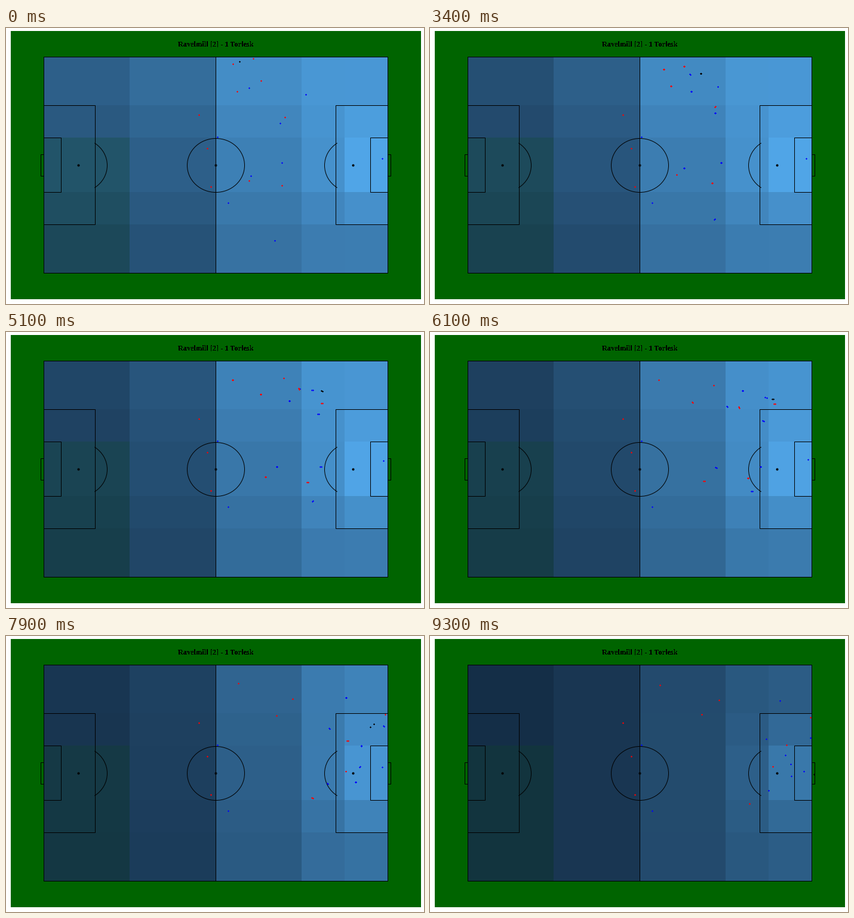
Write a matplotlib script that moves like this. It is 700 by 461 pixels and loops after 10000 ms.

```python
import numpy as np
import matplotlib.pyplot as plt
from matplotlib.animation import FuncAnimation
from matplotlib.collections import LineCollection
from matplotlib.patches import Arc, Ellipse, Rectangle

W, H, DPI = 700, 461, 64
PX = 72 / DPI                      # points per pixel
FRAMES, STEP, LAST = 100, 100, 93  # the play stops at LAST, then holds
END = LAST * STEP

# Each runner passes four points, at these moments in ms
KEY_T = np.array([0, 3400, 7100, END])
REDS = [
    [(414, 51), (391, 69), (388, 78), (385, 82)],
    [(380, 60), (426, 64), (478, 100), (484, 107)],
    [(387, 106), (404, 97), (449, 130), (455, 131)],
    [(427, 88), (454, 76), (548, 159), (597, 182)],
    [(467, 149), (478, 131), (619, 126), (637, 136)],
    [(407, 255), (413, 245), (490, 261), (535, 280)],
    [(462, 263), (473, 259), (558, 234), (574, 218)],
]
BLUES = [
    [(391, 56), (436, 78), (552, 100), (586, 108)],
    [(407, 100), (438, 106), (522, 140), (563, 172)],
    [(502, 111), (482, 98), (612, 132), (637, 170)],
    [(459, 159), (478, 142), (586, 168), (595, 199)],
    [(462, 225), (488, 225), (578, 222), (604, 214)],
    [(410, 247), (426, 234), (512, 236), (567, 258)],
    [(450, 355), (477, 319), (566, 253), (605, 234)],
    [(630, 218), (630, 218), (632, 215), (626, 226)],
]
STILL_REDS = [(337, 201), (323, 145), (343, 265)]
STILL_BLUES = [(354, 182), (372, 292)]

# Dribble, carry wide, cross, shot
BALL_T = [0, 3400, 7100, 7700, 8200, END]
BALL = np.array([(391, 56), (454, 76), (620, 126), (632, 131),
                 (577, 184), (643, 231)])

# Control zones: level per column at both ends, and how late it fades
EDGE_X = [63, 207, 351, 495, 567, 639]
EDGE_Y = [48, 129, 183, 274, 328, 409]
START = [.29, .39, .63, .70, .69]
FINISH = [.02, .085, .235, .33, .35]
LATE = [1.1, 1.4, 3, 5, 6.5]
TILT = .05                         # extra level per row towards the top
GOAL = np.array([639, 229])
LOW, HIGH = np.array([[19, 43, 67], [86, 177, 247]]) / 255
GRASS = np.array([0, 100, 0]) / 255


def ease(t):
    u = (t / END) ** 1.4
    return u * u * (3 - 2 * u)


def curves(runs):
    """Cubic coefficients through the four points of each run."""
    return np.linalg.solve(np.vander(ease(KEY_T)), np.array(runs, float))


def along(coefs, t):
    return np.einsum("k,nkd->nd", np.vander([ease(t)], 4)[0], coefs)


def zone_color(r, c, t):
    fade = (t / END) ** LATE[c]
    center = np.array([EDGE_X[c] + EDGE_X[c + 1], EDGE_Y[r] + EDGE_Y[r + 1]]) / 2
    level = START[c] + (FINISH[c] - START[c]) * fade
    level += TILT * (2 - r) * (1 - fade)
    level += .26 * np.exp(-np.sum((center - GOAL) ** 2) / 90 ** 2)
    color = LOW + (HIGH - LOW) * np.clip(level, 0, 1)
    if c == 0 and r >= 2:          # grass shows through the quiet corner
        color = color + .12 * (GRASS - color)
    return color


fig = plt.figure(figsize=(W / DPI, H / DPI), dpi=DPI, facecolor="white")
ax = fig.add_axes([0, 0, 1, 1])
ax.set(xlim=(0, W), ylim=(H, 0))
ax.axis("off")

ax.add_patch(Rectangle((8, 5), 687, 448, fc="#006400", lw=0))
ax.text(351, 31, "Ravelmill [2] - 1 Torlesk", ha="center", va="baseline",
        family="Liberation Serif", weight="bold", size=12.2 * PX,
        antialiased=False)

zones = {}
for r in range(5):
    for c in range(5):
        x, y = EDGE_X[c], EDGE_Y[r]
        zones[r, c] = ax.add_patch(Rectangle(
            (x, y), EDGE_X[c + 1] - x, EDGE_Y[r + 1] - y, lw=0, aa=False))

# Strokes run through pixel centres, so snapping stays off
pen = dict(fill=False, ec="black", lw=PX, snap=False)
MID = (351.5, 229.5)
for x0, x1, y0, y1 in [(63, 639, 48, 409), (63, 351, 48, 409),
                       (63, 149, 129, 328), (552, 639, 129, 328),
                       (63, 92, 183, 274), (610, 639, 183, 274),
                       (58, 63, 211, 247), (639, 644, 211, 247)]:
    ax.add_patch(Rectangle((x0 + .5, y0 + .5), x1 - x0, y1 - y0, **pen))
for size in [(96, 90), (3, 3)]:
    ax.add_patch(Ellipse(MID, *size, **pen))
for x, turn in [(121.5, 0), (581.5, 180)]:
    ax.add_patch(Ellipse((x, MID[1]), 4, 4, fc="black", lw=0))
    ax.add_patch(Arc((x, MID[1]), 96, 90, theta1=turn - 54.3,
                     theta2=turn + 54.3, ec="black", lw=PX, snap=False))


def dot_layer(color, z):
    layer = LineCollection([], colors=color, linewidths=PX, capstyle="butt",
                           snap=False, zorder=z)
    return ax.add_collection(layer, autolim=False)


def plus_marks(points):
    """Two three-pixel strokes for each point."""
    marks = []
    for x, y in np.round(points):
        marks.append([(x - 1, y + .5), (x + 2, y + .5)])
        marks.append([(x + .5, y - 1), (x + .5, y + 2)])
    return marks


teams = [(dot_layer("#0000ff", 5), curves(BLUES), STILL_BLUES),
         (dot_layer("#ff0000", 6), curves(REDS), STILL_REDS)]
ball = dot_layer("black", 7)


def update(f):
    now = min(f, LAST) * STEP
    for (r, c), box in zones.items():
        box.set_facecolor(zone_color(r, c, now))

    # A half-step echo stretches fast dots along their path
    times = [now, now - STEP / 2] if 0 < f < LAST else [now]
    for layer, coefs, still in teams:
        spots = [along(coefs, t) for t in times]
        layer.set_segments(plus_marks(np.vstack(spots + [still])))
    ball.set_segments(plus_marks(
        [[np.interp(t, BALL_T, axis) for axis in BALL.T] for t in times]))
    return [layer for layer, _, _ in teams] + [ball]


anim = FuncAnimation(fig, update, frames=FRAMES, interval=STEP,
                     init_func=lambda: update(0), repeat=True,
                     repeat_delay=0, blit=False)
plt.show()
```
